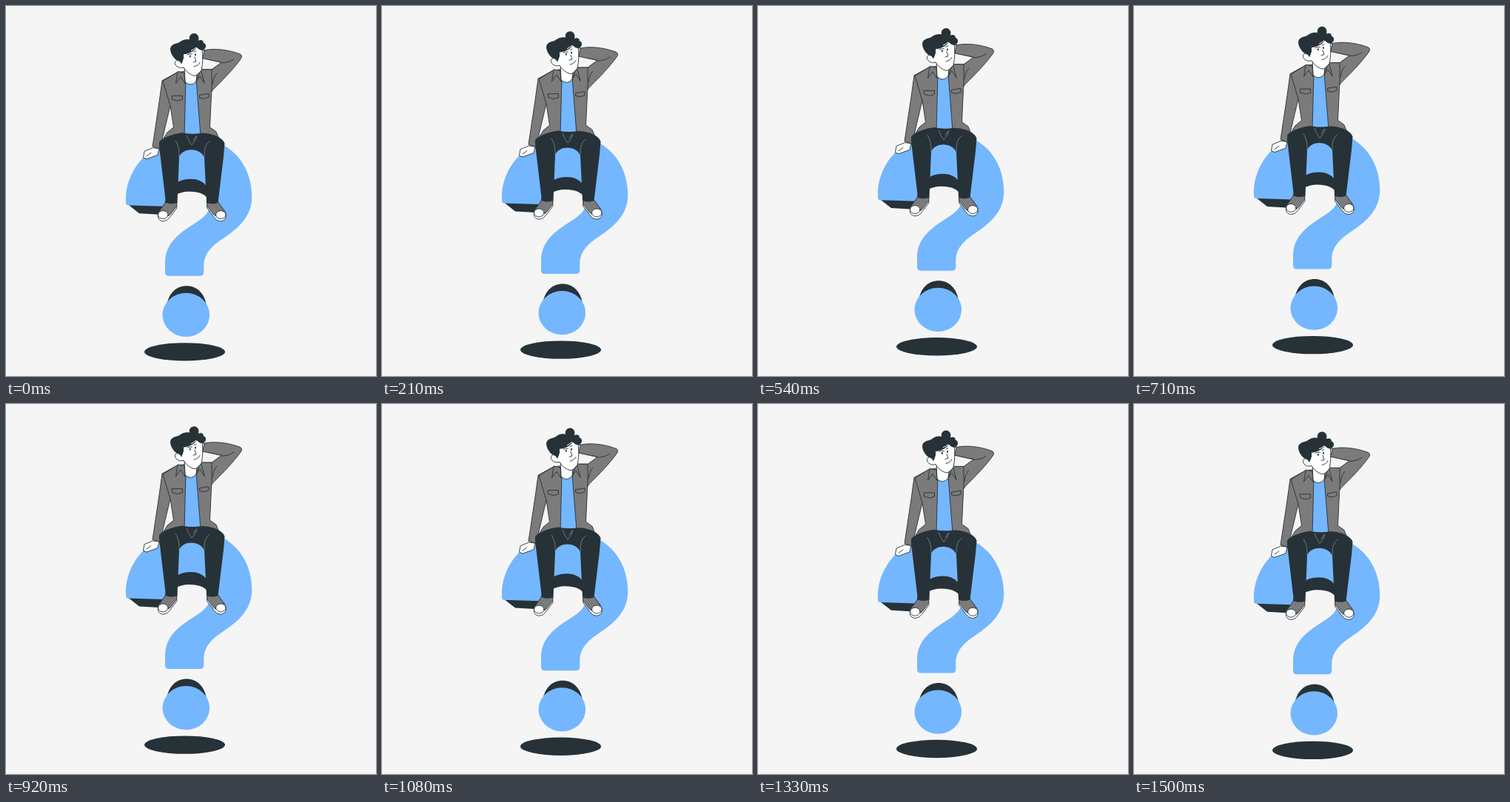
Recreate the animation shown at these times as an HTML page. Size 500 by 500 pixels, loop 1.54 s.

```html
<!DOCTYPE html>
<html lang="en">
<head>
<meta charset="utf-8">
<title>Wondering</title>
<style>
  html, body { margin: 0; height: 100%; overflow: hidden; background: #f5f5f5; }
  svg { display: block; width: 100vw; height: 100vh; }
  .ink { fill: #263238; }
  .blue { fill: #74b7ff; }
  .grey { fill: #7b7b7b; }
  .white { fill: #fff; }
  .back { fill: #f5f5f5; }
  .line { fill: none; }
  .edge { stroke: #263238; stroke-width: .9; stroke-linejoin: round; stroke-linecap: round; }
  .seam { fill: none; stroke: #8b9295; stroke-width: .7; stroke-linecap: round; }
</style>
</head>
<body>
<svg viewBox="0 0 500 500">
  <g id="scene">
    <ellipse class="ink" cx="241.500" cy="467.500" rx="54.500" ry="12.200"/>

    <!-- question mark -->
    <path class="ink" d="M217 405C220 388 230 378.500 244 378.500S268 388 271 405Z"/>
    <ellipse class="blue" cx="243.300" cy="417.600" rx="31.800" ry="29.600"/>
    <path class="ink" d="M163 267L180 280.300L206 281.800L215 271C218 259 233 251 248 251S272 256 276 266L285 250L260 228L215 240Z"/>
    <path class="blue" d="M164 269.500Q162 269 162 266V262C162 218 199 179 250 178S332.300 213 332.300 258C332.300 284 315 300 294 314C275 326.500 267.300 337 267.300 352V360Q267.300 365 262 365H220Q215 365 215 360V348C215 323 230 310 252 296C268 286 276 279 276 266C278 246 267 234 250 234C230 234 217 246 214 271Z"/>

    <!-- shoes -->
    <g id="shoe" class="edge">
      <path class="white" d="M216 266L206.500 278C203.500 285 206 291 213 291Q218 291 222 285L231 273L230 265Z"/>
      <path class="grey" d="M216 265L207 277.500L219 284L222 282L230.500 271L231 265Z"/>
      <ellipse class="white" cx="212.300" cy="282.300" rx="6.700" ry="5.500"/>
    </g>
    <use href="#shoe" transform="matrix(-1 0 0 1 502.500 0)"/>

    <!-- resting arm -->
    <path class="white edge" d="M198 192L187 196.500L185.500 205L190 207L205 201.500L207 193Z"/>
    <path class="line edge" d="M190 203L196 198.500"/>
    <path class="grey edge" d="M231 90L211 101L207 130L198 190L208 193.500L222 135Z"/>

    <!-- raised arm -->
    <path class="grey edge" d="M264 87L278 86L291 76L265 71L268 60C282 57 300 59 316 65Q320.500 67 317 72C307 86 294 99 280 113L275 120Z"/>
    <path class="back edge" d="M262 86L278 86L291 76.500L266 71Z"/>
    <path class="line edge" d="M291 77Q301 77 308 72M279 106Q280 96 285 91"/>
    <path class="white edge" d="M262 61L268 59.500L266 70.500L262 71Z"/>

    <!-- jacket and shirt -->
    <path class="grey edge" d="M231 90L212 101.500L222 135L226.500 164L218 171L213 179L245 182L288 180L284 170L275.500 164L278 110L278 86L263 86Z"/>
    <path class="blue edge" d="M243 99L241 176H263L257 99Q250 109 243 99Z"/>
    <path class="white edge" d="M241 80L242 103Q250 110 257 102L258 91Z"/>
    <path class="grey edge" d="M232 89L229.500 104.500L236 96L242 105L241 91ZM263 86L257 102L262 95L268 104Z"/>
    <path class="line edge" d="M224.500 121.500H238.500V126.500L232 128.500L225 126.500ZM262 120.500L274 118.500V123.500L268 125.500L262 124.500Z"/>

    <!-- trousers -->
    <path class="ink" d="M207 184C211 178 225 173 238 171.300Q251 174 264 172C279 172 293 178 295.500 186L294 204L286.500 266Q279 269 271 266L268 205C263 191 239 191 234 204L231.500 266Q223 269 216 266L207 190Z"/>
    <path class="seam" d="M244 175Q247 183 251 188Q256 183 258 176M234 204Q235 191 229 182M268 204Q267 188 275 183M253 182L257 176"/>

    <!-- head -->
    <path class="white edge" d="M239 62L238 75C234 72 228 73 228.300 77.500C229 82 235 85 240 83Q244 91 254 94.500Q258 95 264 87Q267 74 265 58L252 54Z"/>
    <path class="ink" d="M237 79C236 75 232 74 230 73C225 69 222 63 222 58C223 50 232 52 236 48Q241 44 248 45.500C246 36 259 34 260.500 43L260 47C263 45 268 47 266.500 50C272 51 271 60 264.500 60Q261 60 258 56C254 62 247 65 240 65.500L240 71Z"/>
    <path class="line" stroke="#fff" d="M250 60.500Q254 59 257 56"/>
    <path class="line edge" d="M245 66Q248 64 251.500 65M254 62.500L257 61M255 69L257 75L253 76M254 82Q260 81 262 76.500"/>
    <ellipse class="ink" cx="248.800" cy="68" rx="1" ry="1.600"/>
    <ellipse class="ink" cx="256" cy="66" rx="1" ry="1.600"/>
  </g>
</svg>
<script>
  const LOOP = 1540, LOWEST_AT = 1490, RISE = 10;
  const scene = document.getElementById('scene');

  // Steady rise and fall, half a loop each.
  function draw(now) {
    const phase = (now - LOWEST_AT + LOOP) % LOOP / LOOP;
    const height = 1 - Math.abs(1 - 2 * phase);
    scene.setAttribute('transform', `translate(0 ${0.5 - RISE * height})`);
    requestAnimationFrame(() => draw(performance.now()));
  }
  draw(performance.now());
</script>
</body>
</html>
```
